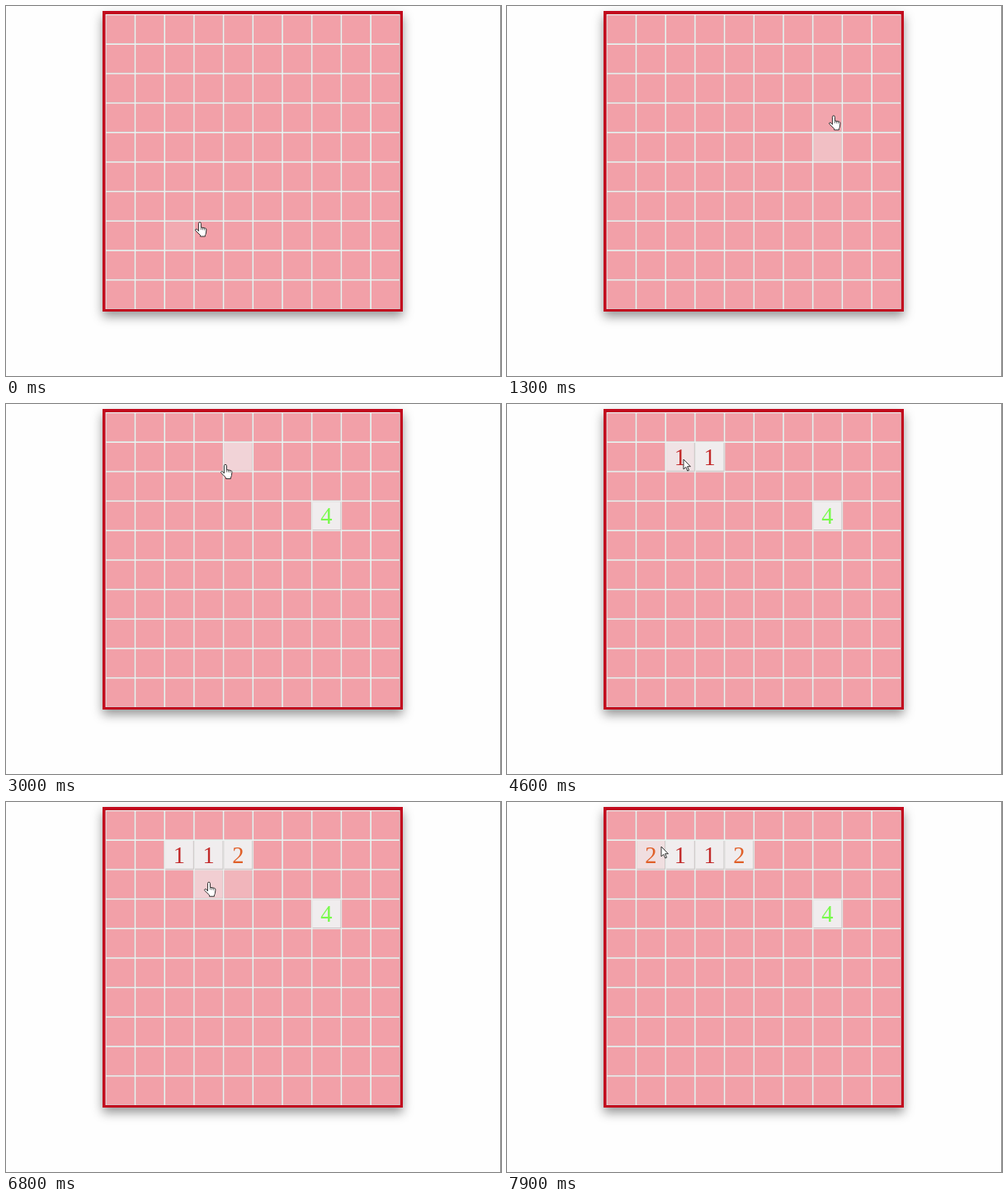
Write an HTML page with a canvas that moves like this. It is 600x448 px and loops after 8000 ms.

```html
<!DOCTYPE html>
<html lang="en">
<head>
<meta charset="utf-8">
<style>
  html, body { margin: 0; width: 100%; height: 100%; overflow: hidden; background: #fefefe; }
  #stage { position: relative; width: 600px; height: 448px; overflow: hidden; }
  #shadow {
    position: absolute; left: 117px; top: 6px; width: 364px; height: 364px;
    box-shadow: 0 6px 12px rgba(0, 0, 0, .42);
  }
  canvas { position: absolute; left: 0; top: 0; }
</style>
</head>
<body>
<div id="stage"><div id="shadow"></div><canvas width="600" height="448"></canvas></div>
<script>
const ctx = document.querySelector('canvas').getContext('2d');
const LOOP = 8000, FRAME = 100, STEP = 20;
const LAG = 100, FADE = 300, HOVER = 0.87; // hover follows the pointer late
const SIZE = 10, PITCH = 35.7, LEFT = 120.7, TOP = 10.3;

// Each move leads on from the one before; bend bows it sideways.
const home = { x: 200, y: 278 };
const moves = [
  { from: -200, to: 0, x: 235, y: 262 },
  { from: 0, to: 1300, x: 396, y: 133, bend: .21 },
  { from: 2300, to: 2750, x: 285, y: 74 },
  { from: 2750, to: 3250, x: 247, y: 73 },
  { from: 3900, to: 4200, x: 214, y: 67 },
  { from: 5000, to: 5300, x: 284, y: 69 },
  { from: 6100, to: 7150, x: 221, y: 82, bend: -.7 },
  { from: 7300, to: 7600, x: 187, y: 54 }
];

const opened = [
  { at: 1900, col: 7, row: 3, digit: 4 },
  { at: 3500, col: 3, row: 1, digit: 1 },
  { at: 4600, col: 2, row: 1, digit: 1 },
  { at: 5700, col: 4, row: 1, digit: 2 },
  { at: 7900, col: 1, row: 1, digit: 2 }
];

const hand = new Path2D('M-1.6 10.5V1.3a1.5 1.5 0 0 1 3 0V6l5 1q1.6.4 1.5 2l-.5 4q-.2 1.5-1 2.5V17H.5V15.5L-5.2 10q-.8-1.2.4-1.8 1-.3 1.8.5z');
const knuckles = new Path2D('M1.4 6V9M3.5 6.5V9.2M5.6 7V9.5');
const arrow = new Path2D('M0 0V12l2.8-2.6 2 4.6 1.8-.8-2-4.5h3.8z');

const mix = (a, b, k) => a + (b - a) * k;
const digitColor = d => `hsl(${18 * (d - 1) ** 1.6}, ${55 + 10 * d}%, ${40 + 6 * d}%)`;

function pointer(t) {
  const i = Math.max(0, moves.findLastIndex(m => m.from <= t));
  const b = moves[i], a = moves[i - 1] || home;
  const k = Math.max(0, Math.min(1, (t - b.from) / (b.to - b.from)));
  const bow = 2 * k * (1 - k) * (b.bend || 0);
  return [
    mix(a.x, b.x, k) - bow * (b.y - a.y),
    mix(a.y, b.y, k) + bow * (b.x - a.x)
  ];
}

function cellAt([x, y]) {
  return Math.floor((y - TOP) / PITCH) * SIZE + Math.floor((x - LEFT) / PITCH);
}

function openCells(t) {
  return new Map(opened.filter(o => o.at <= t).map(o => [o.row * SIZE + o.col, o]));
}

// Replays the hover fades up to time t.
function lightAt(t) {
  const light = new Array(SIZE * SIZE).fill(0), d = STEP / FADE;
  for (let s = -2 * STEP; s < t; s += STEP) {
    const over = cellAt(pointer(s - LAG)), open = openCells(s);
    for (let i = 0; i < light.length; i++) {
      const goal = open.has(i) ? 1 : i === over ? HOVER : 0;
      light[i] += Math.max(-d, Math.min(d, goal - light[i]));
    }
  }
  return light;
}

function rect(color, x, y, w, h) {
  ctx.fillStyle = color;
  ctx.fillRect(x, y, w, h);
}

function drawCell(i, light, open) {
  const x = LEFT + i % SIZE * PITCH, y = TOP + Math.floor(i / SIZE) * PITCH;
  const w = PITCH - 2, bevel = w + (open ? 1 : .5);
  rect('#cbc4c4', x + 1, y + 1, bevel, bevel);
  const tone = [[242, 240], [160, 237], [168, 238]].map(([a, b]) => mix(a, b, light));
  rect(`rgb(${tone})`, x + 1, y + 1, w, w);
  if (!open) return;
  ctx.fillStyle = digitColor(open.digit);
  ctx.fillText(open.digit, x + PITCH / 2, y + 27.6);
}

function drawPointer([x, y], shape) {
  ctx.save();
  ctx.translate(x, y);
  ctx.fillStyle = '#fff';
  ctx.strokeStyle = '#333';
  ctx.fill(shape);
  ctx.stroke(shape);
  if (shape === hand) {
    ctx.lineWidth = .7;
    ctx.stroke(knuckles);
  }
  ctx.restore();
}

function draw(t) {
  ctx.clearRect(0, 0, 600, 448);
  rect('#8a8a8a', 599, 0, 1, 448);
  rect('#c20a1e', 117, 6, 364, 364);
  rect('#edf2f0', 120.6, 10, 357, 357);
  ctx.font = '28.5px "Liberation Serif", "Times New Roman", serif';
  ctx.textAlign = 'center';
  const open = openCells(t), at = pointer(t);
  lightAt(t).forEach((light, i) => drawCell(i, light, open.get(i)));
  drawPointer(at, open.has(cellAt(at)) ? arrow : hand);
}

let start, shown;
function tick(now) {
  start ??= now;
  const t = Math.floor((now - start) % LOOP / FRAME) * FRAME;
  if (t !== shown) draw(shown = t);
  requestAnimationFrame(tick);
}
draw(0);
requestAnimationFrame(tick);
</script>
</body>
</html>
```
